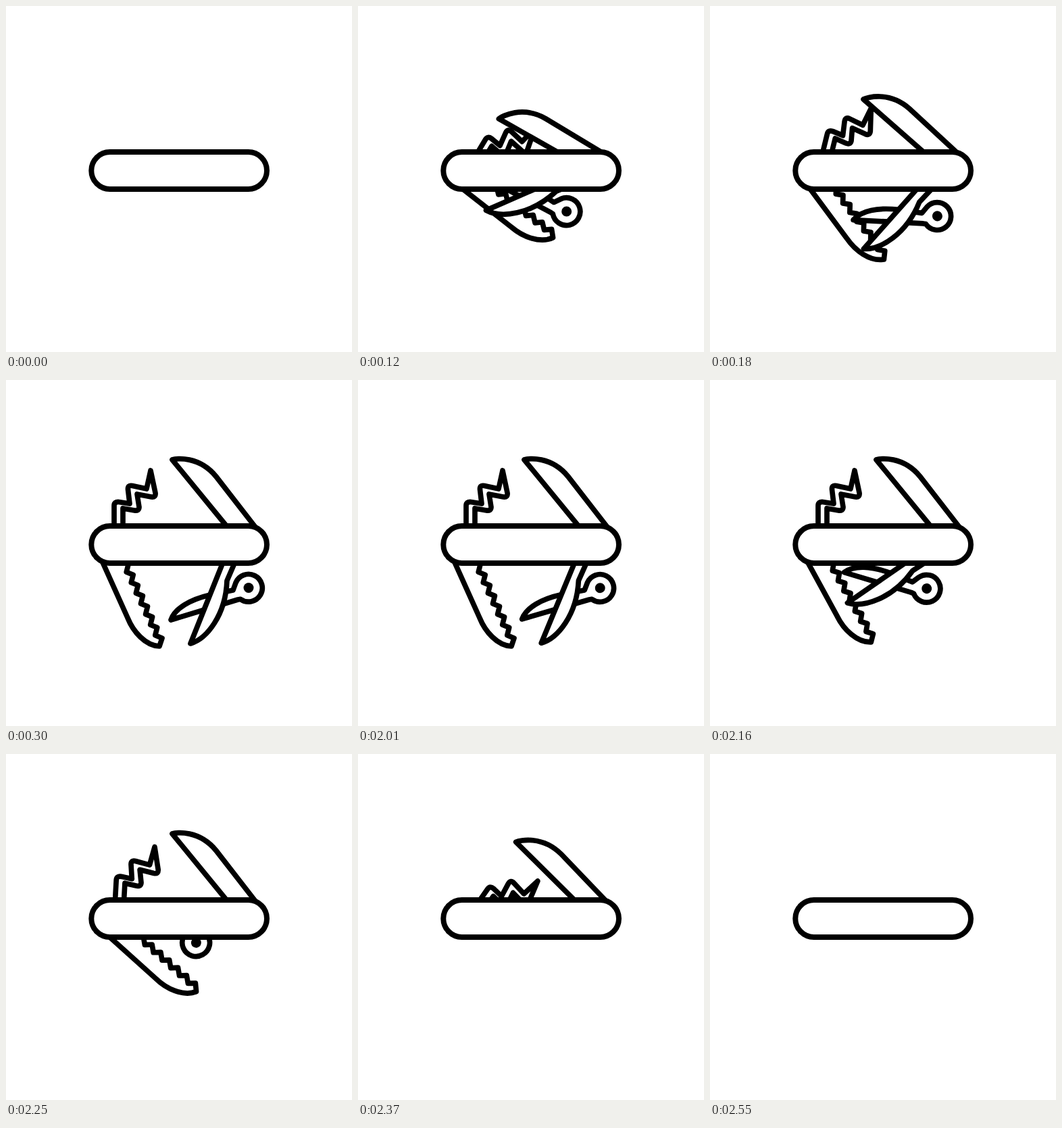
Write an HTML page that moves like this. It is 512 by 512 pixels and loops after 3150 ms.

```html
<!DOCTYPE html>
<html lang="en">
<head>
<meta charset="utf-8">
<title>Pocket knife</title>
<style>
  html, body { margin: 0; width: 100%; height: 100%; overflow: hidden; background: #fff; }
  svg { display: block; width: 100%; height: 100%; }
</style>
</head>
<body>
<svg viewBox="0 0 512 512" fill="#fff" stroke="#000" stroke-width="7.7" stroke-linecap="round" stroke-linejoin="round">
  <clipPath id="above"><rect width="512" height="243.5"/></clipPath>
  <clipPath id="below"><rect y="243.5" width="512" height="268.5"/></clipPath>

  <g clip-path="url(#above)">
    <path id="corkscrew" d="M160 243V186Q160 180 167 180.5L183 183 180.5 162Q180 155 187 156.5L208 161 214 134 221 167Q222 174 215 173L194 169 197 188Q197 194 190 193L173 190V243"/>
    <path id="blade" d="M341 234L246 118C252 116 286 112 311 143L377 228"/>
  </g>
  <g clip-path="url(#below)">
    <path id="saw"/>
    <g id="scissors">
      <path d="M244 355C250 338 272 325 302 318L336 311 340 300A20.4 20.4 0 1 1 347 324.3L343 325Z"/>
      <circle cx="359" cy="307.5" r="7.5" fill="#000" stroke="none"/>
      <path d="M331 245L273 390C297 383 325 348 327 297L349 246"/>
    </g>
  </g>
  <rect x="126.3" y="216" width="259.7" height="55" rx="27.5" stroke-width="8"/>
</svg>
<script>
const LOOP = 3150, STEP = 30;
const OPEN_START = 20, OPEN_TIME = 280;

// angle: rotation from the open pose to the folded pose
const tools = [
  { id: 'scissors',  pivot: [338, 244.5],   angle: 108, start: 1985, time: 314 },
  { id: 'saw',       pivot: [154, 243.5],   angle: -67, start: 2092, time: 265 },
  { id: 'corkscrew', pivot: [154, 243.5],   angle: 75,  start: 2198, time: 252 },
  { id: 'blade',     pivot: [358.5, 243.5], angle: -51, start: 2285, time: 250 }
];
for (const tool of tools) tool.node = document.getElementById(tool.id);

document.getElementById('saw').setAttribute('d',
  'M164 253' + 'l10 4-2.9 11.6'.repeat(8) + 'L231 382 227 394C206 393 188 372 180 352L135 252');

const progress = (t, start, time) => Math.min(1, Math.max(0, (t - start) / time));

function foldedAmount(t, { start, time }) {
  const opening = 1 - progress(t, OPEN_START, OPEN_TIME);
  const closing = progress(t, start, time);
  return opening ** 2 + closing ** 2;
}

function draw() {
  const t = Math.floor(performance.now() % LOOP / STEP) * STEP;
  for (const tool of tools) {
    const turn = tool.angle * foldedAmount(t, tool);
    tool.node.setAttribute('transform', `rotate(${turn} ${tool.pivot})`);
  }
  requestAnimationFrame(draw);
}
draw();
</script>
</body>
</html>
```
